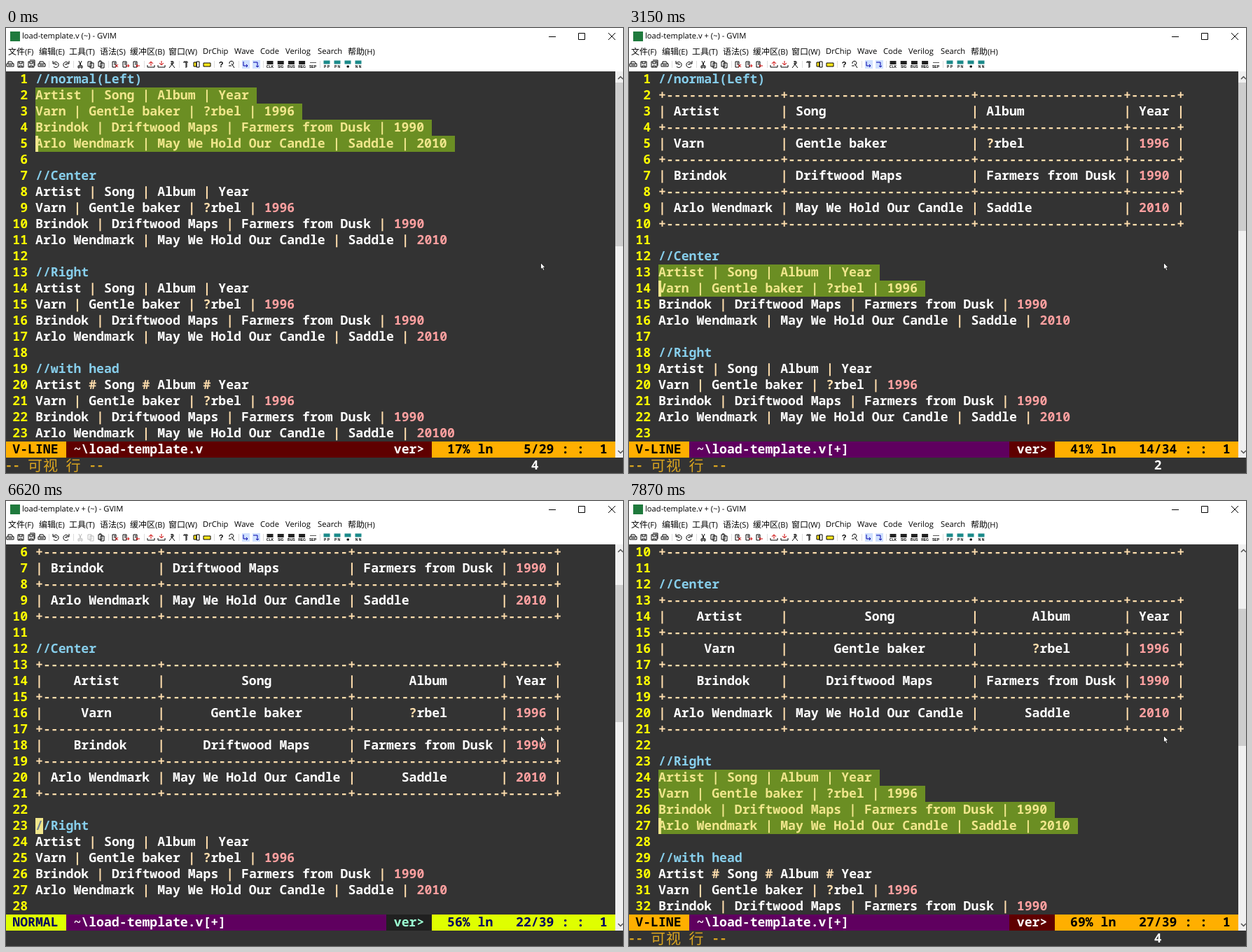
Recreate the animation shown at these times as an HTML page. Size 881 px wide and 636 px high, loop 8000 ms.

```html
<!DOCTYPE html>
<html lang="zh">
<head>
<meta charset="utf-8">
<title>Table alignment in an editor</title>
<style>
html, body { margin: 0; width: 100%; height: 100%; overflow: hidden; background: #fff; }
#stage { position: absolute; left: 0; top: 0; width: 881px; height: 636px; overflow: hidden; background: #fff; }
#editor { position: absolute; left: 0; top: 62px; width: 881px; height: 574px; overflow: hidden; background: #333; }
#editor i { position: absolute; }
#editor span {
  position: absolute; white-space: pre; color: #fff;
  font: bold 18.15px/22px "Noto Sans Mono", "DejaVu Sans Mono", monospace;
  text-rendering: geometricPrecision; font-variant-ligatures: none;
}
#editor .cjk { font: 21px/22px "Noto Sans CJK SC", "Noto Sans CJK", sans-serif; }
.ui { position: absolute; white-space: pre; color: #000; text-rendering: geometricPrecision;
  font: 11.2px/18px "Open Sans", "Noto Sans", sans-serif; }
.ui b { font: 12px/18px "Noto Sans CJK SC", "Noto Sans CJK", sans-serif; }
svg { position: absolute; left: 0; top: 0; }
#bar { position: absolute; left: 870px; top: 62px; width: 11px; height: 552px; background: #f0f0f0; }
#thumb { position: absolute; left: 0; width: 11px; background: #cdcdcd; }
</style>
</head>
<body>
<div id="stage">
  <div id="editor"></div>
  <div id="bar"><div id="thumb"></div></div>
  <svg id="chrome" width="881" height="636" fill="none" stroke="#000"></svg>
  <div id="title" class="ui" style="left:23px;top:3px"></div>
</div>
<script>
const W = 10.89, X0 = -1.56, ROW = 23, ROWS = 23, LOOP = 8000;
const WHITE = '#fff', OP = '#ffdead', NUM = '#ffa0a0', KHAKI = '#f0e68c', SKY = '#87ceeb';
const $ = id => document.getElementById(id);
const editor = $('editor');

// ---- document ----
const records = [
  ['Artist', 'Song', 'Album', 'Year'],
  ['Varn', 'Gentle baker', '?rbel', '1996'],
  ['Brindok', 'Driftwood Maps', 'Farmers from Dusk', '1990'],
  ['Arlo Wendmark', 'May We Hold Our Candle', 'Saddle', '2010']
];
const widths = [13, 22, 17, 4];
const plain = records.map(r => r.join(' | '));
const headed = [records[0].join(' # '), ...plain.slice(1, 3), plain[3] + '0'];

function boxed(centered) {
  const rule = '+' + widths.map(w => '-'.repeat(w + 2)).join('+') + '+';
  const lines = [rule];
  for (const r of records) {
    const cells = r.map((s, i) => {
      const pad = centered ? Math.floor((widths[i] - s.length) / 2) : 0;
      return ' ' + (' '.repeat(pad) + s).padEnd(widths[i]) + ' ';
    });
    lines.push('|' + cells.join('|') + '|', rule);
  }
  return lines;
}

const makeDoc = (left, center) => [
  '//normal(Left)', ...left, '', '//Center', ...center, '',
  '//Right', ...plain, '', '//with head', ...headed, ''
];
const docs = [
  makeDoc(plain, plain),
  makeDoc(boxed(false), plain),
  makeDoc(boxed(false), boxed(true))
];
const totals = [29, 34, 39];

// ---- timeline: each step changes part of the state ----
// from: first selected line (0 = normal mode), at: line in the ruler if it lags
const steps = [
  [0, { doc: 0, top: 1, cur: 5, from: 2, cmd: '4', msg: '', at: 0, off: false }],
  [50, { cmd: '\\' }],
  [300, { cmd: '4\\t' }],
  [450, { doc: 1, cur: 2, from: 0, cmd: '', msg: '4 fewer lines' }],
  [1040, { cur: 3 }], [1160, { cur: 4 }], [1500, { cur: 5 }], [1650, { cur: 6 }], [1820, { cur: 7 }],
  [2330, { cur: 8 }], [2380, { cur: 10 }], [2420, { cur: 11 }], [2470, { cur: 13 }],
  [2970, { from: 13, cmd: '1' }],
  [3150, { cur: 14, cmd: '2' }], [3280, { cur: 15, cmd: '3' }], [3500, { cur: 16, cmd: '4' }],
  [4090, { cmd: '\\' }],
  [4320, { cmd: '4\\t' }],
  [4580, { doc: 2, top: 5, cur: 13, from: 0, cmd: '', msg: '' }],
  [4640, { msg: '4 fewer lines' }],
  [5290, { off: true }], [5540, { off: false }],
  [5720, { cur: 14 }], [6180, { cur: 15 }], [6220, { cur: 16 }], [6260, { cur: 18 }],
  [6300, { cur: 19 }], [6350, { cur: 21 }], [6390, { cur: 22 }],
  [6620, { top: 6, cur: 23, at: 22, msg: '' }], [6680, { at: 0 }],
  [6760, { top: 7, cur: 24, at: 23 }], [6840, { at: 0 }],
  [7330, { from: 24, cmd: '1' }],
  [7540, { top: 8, cur: 25, cmd: '2' }],
  [7690, { top: 9, cur: 26, cmd: '3' }],
  [7870, { top: 10, cur: 27, cmd: '4' }]
];
const states = [];
steps.forEach(([, change], i) => states.push({ ...states[i - 1], ...change }));

// ---- drawing on the character grid ----
function add(tag, col, row, style) {
  const el = document.createElement(tag);
  el.style.left = X0 + col * W + 'px';
  el.style.top = row * ROW + 'px';
  Object.assign(el.style, style);
  editor.append(el);
  return el;
}
function put(col, row, text, color = WHITE) {
  const el = add('span', col, row, { color });
  el.textContent = text;
  return el;
}
function fill(col, row, cols, background) {
  add('i', col, row, { width: cols * W + 'px', height: ROW + 'px', background });
}

function drawLine(text, row, selected) {
  if (selected) {
    fill(4, row, text.length + 1, '#6b8e23');
    put(4, row, text, KHAKI);
  } else if (text.startsWith('//')) {
    put(4, row, text, SKY);
  } else {
    for (const m of text.matchAll(/([|+#?-]+)|(\d+)|[^|+#?\d-]+/g))
      if (m[0].trim()) put(4 + m.index, row, m[0], m[1] ? OP : m[2] ? NUM : WHITE);
  }
}

function drawStatus(s) {
  const visual = s.from > 0, row = ROWS;
  const accent = visual ? '#ffaf00' : '#dfff00';
  const ink = visual ? '#000' : '#00005f';
  const total = totals[s.doc], line = s.at || s.cur;
  const percent = String(Math.floor(line * 100 / total)).padStart(3);
  fill(0, row, 8, accent);
  fill(8, row, 42, s.doc ? '#5f005f' : '#5f0000');
  fill(50, row, 6, visual ? '#5f0000' : '#202020');
  fill(56, row, 24, accent);
  put(1, row, visual ? 'V-LINE' : 'NORMAL', ink);
  put(9, row, '~\\load-template.v' + (s.doc ? '[+]' : ''));
  put(51, row, 'ver>', visual ? WHITE : '#9cffd3');
  put(57, row, `${percent}% ln ${(line + '/' + total).padStart(7)} : :  1`, ink);

  if (visual) {
    const gold = '#daa520';
    put(0, row + 1, '--', gold);
    [[3, '可'], [5, '视'], [8, '行']].forEach(([c, ch]) => put(c, row + 1, ch, gold).className = 'cjk');
    put(11, row + 1, '--', gold);
  } else {
    put(0, row + 1, s.msg);
  }
  put(69, row + 1, s.cmd);
}

function drawCursor(s) {
  const row = s.cur - s.top;
  if (s.from) {
    fill(4, row, 0.35, KHAKI);
  } else if (!s.off) {
    fill(4, row, 1, KHAKI);
    put(4, row, docs[s.doc][s.cur - 1].charAt(0), '#708090');
  }
}

function draw(s) {
  editor.textContent = '';
  for (let row = 0; row < ROWS; row++) {
    const n = s.top + row;
    put(0, row, String(n).padStart(3), '#ff0');
    drawLine(docs[s.doc][n - 1], row, s.from && n >= s.from && n <= s.cur);
  }
  drawCursor(s);
  drawStatus(s);
  $('title').textContent = `load-template.v ${s.doc ? '+ ' : ''}(~) - GVIM`;
  $('thumb').style.top = 16 + (s.top - 1) * 8.4 + 'px';
  $('thumb').style.height = [234, 212, 196][s.doc] + 'px';
  for (const el of document.querySelectorAll('.edit'))
    el.setAttribute('stroke', s.from ? '#000' : '#bbb');
}

// ---- window chrome ----
const page = 'M-4-4H1V3H-4ZM-1-2H4V5H-1Z', disk = 'M-4-4H4V4H-4ZM-2-4V-1H2V-4M-2 4V2H2V4';
const printer = 'M-5-1H5V3H-5ZM-3-1V-4H2L4-1M-3 1H3';
const lens = 'M-4-4H1V4H-4ZM-2-2H0M-2 0H0', red = '#c00';
const turn = 'M-3-2A4 4 0 1 1-3 3M-4-5V-1H0M-1 0H2';
const tray = 'M-5 1V4H5V1';
const icons = [
  [6, printer], [21, disk], [36, disk + 'M-2-6H5V2'], [51, printer],
  [71, turn], [86, turn, '#000', 'scale(-1 1)'],
  [106, 'M-2-5L1 2M2-5L-1 2M-3 2H-1V5H-3ZM1 2H3V5H1Z', 'edit'], [121, page, 'edit'], [136, page + 'M-3-5H0'],
  [156, lens], [171, lens], [186, lens], [207, tray], [222, tray],
  [237, 'M0-5V0L-4 5M0 0L4 5M-2-4H2V-1H-2'],
  [257, 'M-4-3H3M0-3V5M-3-4H2M1-2V4'], [272, 'M-4-3H0V3H-4ZM0-4H4V4H0Z'], [287, 'M-5-2H5V3H-5Z'],
  [322, 'M-3-1A3 3 0 1 1 1 1M0-1L4 5M-4 2H0']
];
const marks = [
  [156, 'M0 0L4 4M4 0L0 4', red], [171, 'M0 2H5M3 0L5 2L3 4', red], [186, 'M0 2H5M2 0L0 2L2 4', red],
  [207, 'M0 2V-4M-3-1L0-4L3-1', red], [222, 'M0-5V1M-3-2L0 1L3-2', red],
  [342, 'M-3-4V2H3M1 0L3 2L1 4', '#00a'], [357, 'M-4-3H2V4M0 2L2 4L4 2', '#00a']
];
const at = (x, d, color, extra = '') =>
  `<path transform="translate(${x} 52) ${extra}" d="${d}" ${color === 'edit' ? 'class="edit"' : `stroke="${color}"`}/>`;
const rect = (x, y, w, h, color) => `<rect x="${x}" y="${y}" width="${w}" height="${h}" fill="${color}" stroke="none"/>`;
const tiny = (x, text) =>
  `<text x="${x}" y="57" font-family="Liberation Sans, sans-serif" font-size="5" font-weight="bold" text-anchor="middle" fill="#000" stroke="none">${text}</text>`;

let art = rect(6, 5, 14, 14, '#1f7a3d');
art += '<path d="M775 12.5H785M817.5 7.5H826.5V16.5H817.5ZM860 7L870 17M870 7L860 17"/>';
art += '<path d="M874 73L877.5 69.5L881 73M874 604L877.5 607.5L881 604" stroke="#505050" stroke-width="1.5"/>';
art += rect(337, 46, 11, 12, '#cfe0ff') + rect(352, 46, 11, 12, '#cfe0ff');
art += rect(282, 50, 10, 5, '#ffe81a') + rect(268, 49, 4, 6, '#ffe81a');
for (const [x, d, color = '#000', extra] of icons) art += at(x, d, color, extra);
for (const [x, d, color] of marks) art += at(x, d, color);
art += '<text x="307" y="56" font-family="Liberation Sans, sans-serif" font-size="11" font-weight="bold" text-anchor="middle" fill="#000" stroke="none">?</text>';
['CLK', 'SIG', 'BUS', 'REG'].forEach((t, i) => art += rect(372.5 + i * 15.2, 47, 9, 5, '#222') + tiny(377 + i * 15.2, t));
art += rect(434, 49, 9, 1, '#555') + tiny(438, 'SEP');
['P P', 'P N', '✱', 'N N'].forEach((t, i) => art += rect(453.5 + i * 15, 46.5, 9, 5, '#1b8a8a') + tiny(458 + i * 15, t));
art += [61, 96, 146, 197, 247, 297, 332, 367, 448].map(x => rect(x, 47, 1, 10, '#ddd')).join('');
art += '<path d="M763.5 335.5V345L765.6 343L767.2 346.5L768.8 345.7L767.3 342.4H770Z" fill="#fff" stroke="#111" stroke-width=".8"/>';
$('chrome').innerHTML = art;

const menu = [[3, '文件(F)'], [47, '编辑(E)'], [90, '工具(T)'], [134, '语法(S)'], [177, '缓冲区(B)'], [232, '窗口(W)'],
  [281, 'DrChip'], [326, 'Wave'], [363, 'Code'], [399, 'Verilog'], [445, 'Search'], [488, '帮助(H)']];
for (const [x, text] of menu) {
  const el = document.createElement('div');
  el.className = 'ui';
  el.style.cssText = `left:${x}px;top:25px`;
  el.innerHTML = text.replace(/[\u4e00-\u9fff]+/, '<b>$&</b>');
  $('stage').append(el);
}

// ---- playback ----
let shown = -1;
function tick() {
  const t = performance.now() % LOOP;
  let i = steps.length - 1;
  while (steps[i][0] > t) i--;
  if (i !== shown) draw(states[shown = i]);
  requestAnimationFrame(tick);
}
tick();
</script>
</body>
</html>
```
